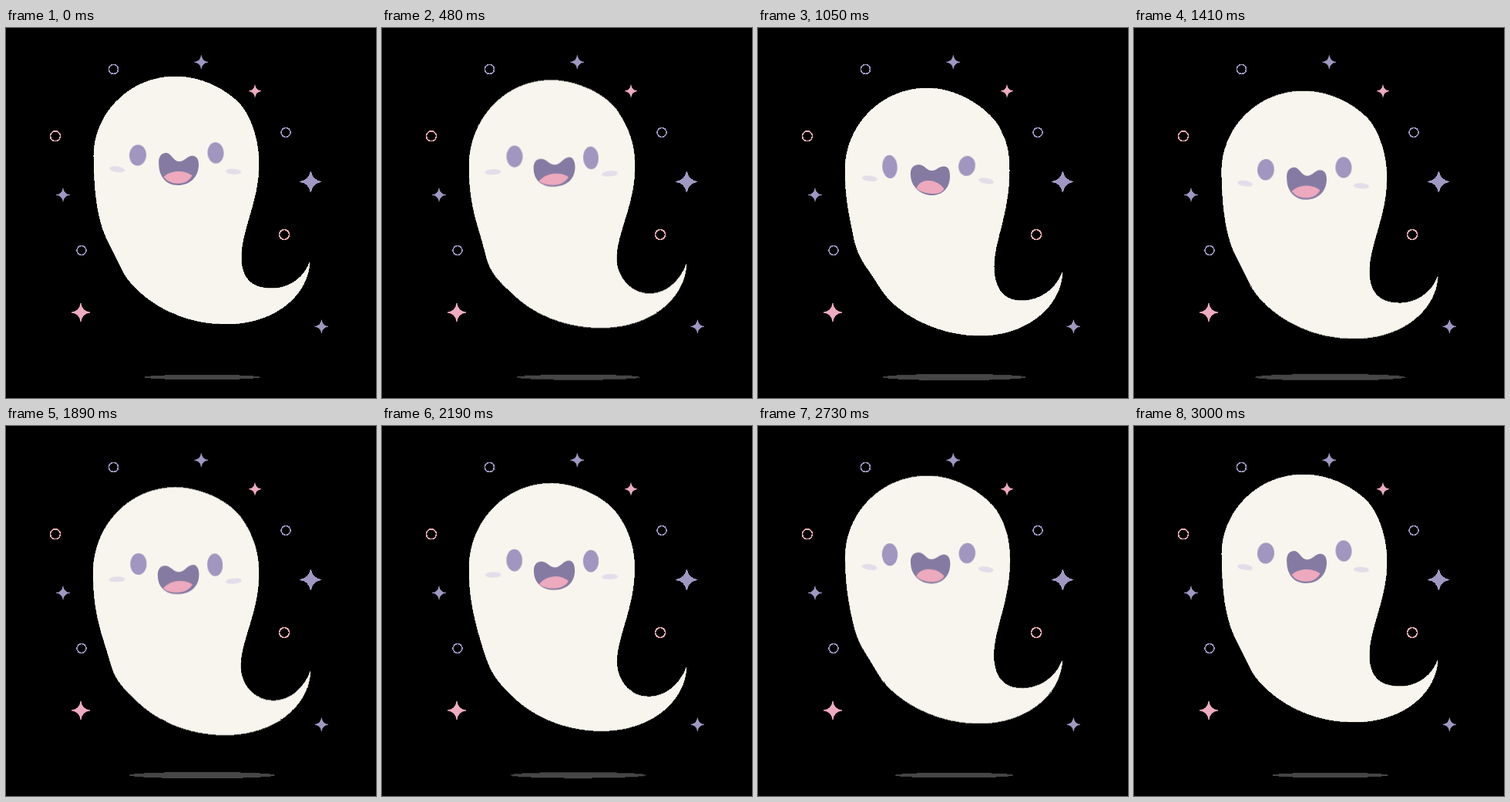
Animation of 480 by 480 pixels, one loop 3.03 s. Source, as an HTML page without scripts:

```html
<!DOCTYPE html>
<html lang="en">
<head>
<meta charset="utf-8">
<title>Floating ghost</title>
<style>
html, body { margin: 0; width: 100%; height: 100%; overflow: hidden; background: #000; }
svg { display: block; width: 100vw; height: 100vh; }

.lilac { fill: #a098c2; stroke: #a098c2; }
.pink { fill: #eeacc0; stroke: #eeacc0; }
.rings { fill: none; stroke-width: 1.6; }
.crisp { shape-rendering: crispEdges; }

/* slow float, twice as long as the wobble */
.float { animation: float 1515ms cubic-bezier(.37,0,.63,1) infinite alternate; }
.shadow { fill: #464646; transform-origin: 254.5px 453px;
  animation: spread 1515ms cubic-bezier(.37,0,.63,1) infinite alternate; }
@keyframes float { to { transform: translateY(19px); } }
@keyframes spread { to { transform: scale(1.305); } }

/* soft wobble through three poses */
.wobble > * { animation: 1515ms cubic-bezier(.4,0,.6,1) infinite; }
.wobble > .body { fill: #f8f5ee; stroke: #f8f5ee; stroke-width: .8; animation-name: body; }
.wobble > .mouth { fill: #857ba2; animation-name: mouth; }
.wobble > .tongue { fill: #eda9bd; animation-name: tongue; }
.eye { fill: #a096bf; }
.blush { fill: #e3dde9; }
.wobble > .eye.l { animation-name: eye-l; }
.wobble > .eye.r { animation-name: eye-r; }
.wobble > .blush.l { animation-name: blush-l; }
.wobble > .blush.r { animation-name: blush-r; }

@keyframes body {
  0%, 100% { d: path("M220 63C160 63 114 111 114 166C114 200 117 231 123 252C128 271 136 283 142 296C149 310 153 321 164 333C190 361 232 384 286 384C345 384 391 350 394 304C386 325 366 338 345 338C316 338 305 322 305 297C305 262 328 225 328 176C328 150 320 118 303 98C283 78 252 63 220 63Z"); }
  33.33% { d: path("M220 63.5C160 63.5 113 113 113 176C113 204 117 228 124 252C129 268 132 280 137 298C143 317 156 328 169 340C192 363 232 384.5 284 384.5C345 384.5 392 350 395 302C386 325 368 340.5 347 340.5C322 340.5 304 317 304 295C304 262 328 225 328 174C328 152 322 128 307 106C293 82 252 63.5 220 63.5Z"); }
  66.67% { d: path("M220 63C160 63 113 111 113 170C113 202 118 226 123 250C127 272 132 283 142 297C153 312 159 325 170 337C193 361 238 384 288 384C345 384 392 350 395 302C386 325 364 339 342 339C315 339 306 318 306 294C306 262 326 225 326 170C326 150 324 133 312 112C296 87 257 63 220 63Z"); }
}
@keyframes mouth {
  0%, 100% { d: path("M198.3 177C197 166 203 161.7 208 162C215 162.5 217 173.5 225 173.2C232 173 235 165.5 242 165.7C247 166 250 170 250 177C250 194 238 204 223 204C208 204 198.5 193 198.3 177Z"); }
  33.33% { d: path("M196.7 179C196 169 201 165 207 165.5C215 166.5 217 173.5 225 173C232 172.5 235.5 163.3 243 163.3C248 163.5 250.5 169 250.5 176C250.5 193 238 201.5 222 201.5C207 201.5 197.2 193 196.7 179Z"); }
  66.67% { d: path("M198 176C197 166 203 162 209 162.3C217 163 219 170.5 226 170C232 169.5 235 164.5 241 164.5C247 164.5 249 170 249 177C249 193 239 202 226 202C211 202 198.5 191 198 176Z"); }
}
@keyframes tongue {
  0%, 100% { d: path("M204.5 193C210 188 217 186 223 186C231 186 237 188 241.5 191.5C237 199 231 201.7 223 201.7C215 201.7 209 199 204.5 193Z"); }
  33.33% { d: path("M203.5 194.5C209 188 217 185 224 184.5C232 184 238 186 242 189C238 196 231 199.3 222 199.5C214 199.6 208 198 203.5 194.5Z"); }
  66.67% { d: path("M205.5 193C209 185 215 183 221 183C230 183 238 188 241.5 194C238 199 232 200.3 226 200C217 199.6 210 197 205.5 193Z"); }
}
@keyframes eye-l {
  0%, 100% { transform: translate(171px,165px) rotate(4deg) scale(11,13.6); }
  33.33% { transform: translate(172px,162.4px) rotate(0deg) scale(10.5,14.1); }
  66.67% { transform: translate(171px,165px) rotate(-4deg) scale(9.7,15.1); }
}
@keyframes eye-r {
  0%, 100% { transform: translate(272px,162px) rotate(-3deg) scale(10.5,13.7); }
  33.33% { transform: translate(271px,164.2px) rotate(-3deg) scale(9.9,14.8); }
  66.67% { transform: translate(271px,164px) rotate(10deg) scale(10.8,13); }
}
@keyframes blush-l {
  0%, 100% { transform: translate(144px,183.3px) rotate(9deg) scale(10,3.8); }
  33.33% { transform: translate(144px,182.5px) rotate(-4deg) scale(10.5,3.6); }
  66.67% { transform: translate(145px,180.4px) rotate(8deg) scale(10,3.8); }
}
@keyframes blush-r {
  0%, 100% { transform: translate(295px,186.4px) rotate(4deg) scale(10,3.7); }
  33.33% { transform: translate(295.5px,184.7px) rotate(-6deg) scale(10.5,3.6); }
  66.67% { transform: translate(296px,183.4px) rotate(10deg) scale(10,3.8); }
}
</style>
</head>
<body>
<svg viewBox="0 0 480 480">
  <defs>
    <path id="star" stroke-width=".8" stroke-linejoin="round" d="M0-10C1-4 4-1 10 0C4 1 1 4 0 10C-1 4-4 1-10 0C-4-1-1-4 0-10Z"/>
  </defs>

  <g class="crisp">
    <g class="lilac">
      <use href="#star" transform="translate(253.3 44.3) scale(.88)"/>
      <use href="#star" transform="translate(395.3 199.5) scale(1.35)"/>
      <use href="#star" transform="translate(74 216.5) scale(.87)"/>
      <use href="#star" transform="translate(409.3 387.3) scale(.86)"/>
    </g>
    <g class="pink">
      <use href="#star" transform="translate(323 81.8) scale(.8)"/>
      <use href="#star" transform="translate(97 369) scale(1.2)"/>
    </g>
    <g class="rings" stroke="#a098c2">
      <circle cx="139.5" cy="53.5" r="6"/>
      <circle cx="363" cy="135.5" r="6"/>
      <circle cx="98" cy="288.5" r="6"/>
    </g>
    <g class="rings" stroke="#f2b1b8">
      <circle cx="64" cy="140.3" r="6.5"/>
      <circle cx="361" cy="268" r="6.5"/>
    </g>
    <ellipse class="shadow" cx="254.5" cy="453" rx="75" ry="3.3"/>
  </g>

  <g class="float">
    <g class="wobble">
      <path class="body crisp"/>
      <circle class="blush l" r="1"/>
      <circle class="blush r" r="1"/>
      <circle class="eye l" r="1"/>
      <circle class="eye r" r="1"/>
      <path class="mouth"/>
      <path class="tongue"/>
    </g>
  </g>
</svg>
</body>
</html>
```
